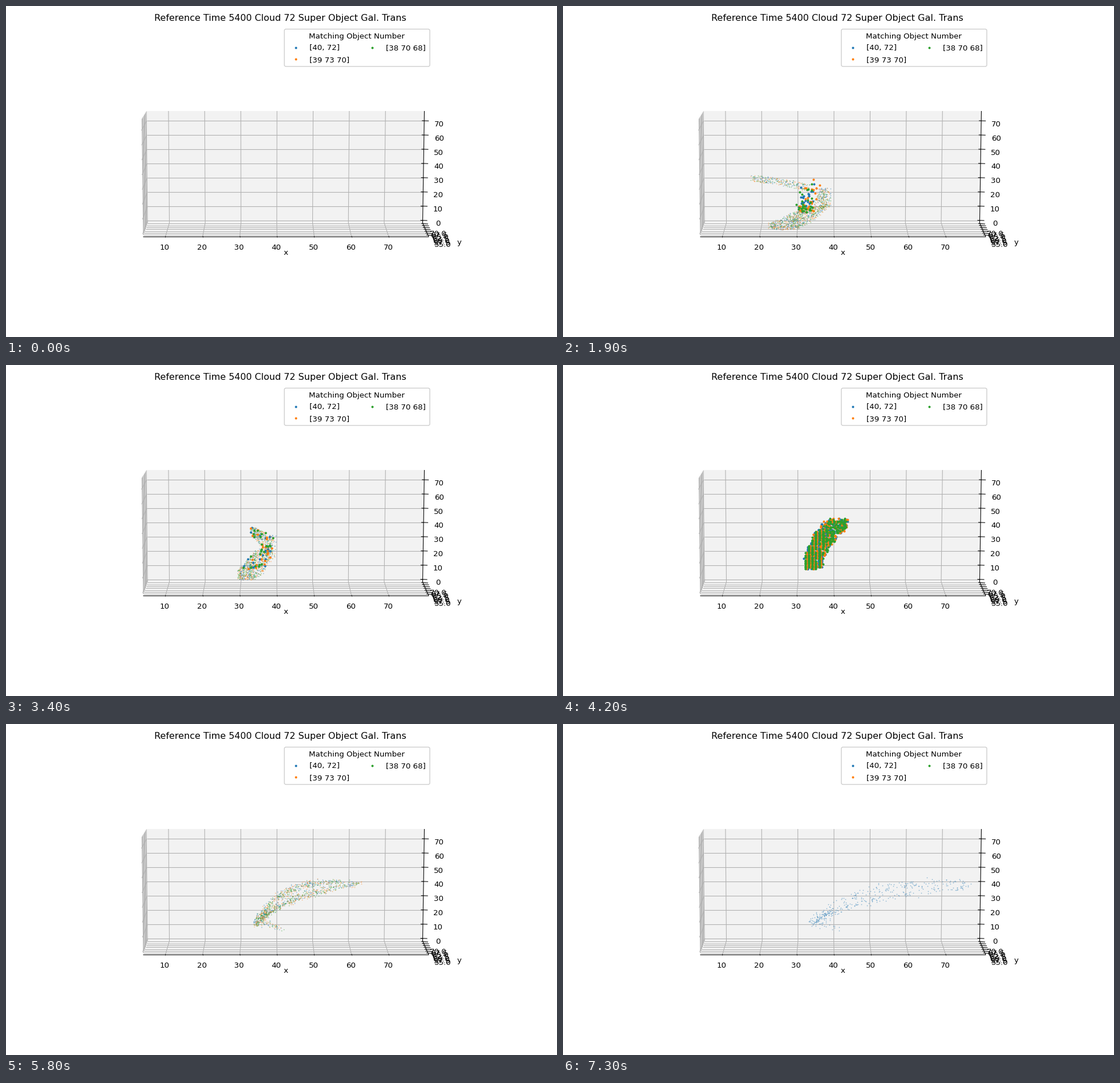
Animation, 966 px wide and 580 px high, one loop 7400 ms. Source, as a matplotlib script:

```python
import numpy as np
import matplotlib.pyplot as plt
from matplotlib.animation import FuncAnimation
from matplotlib.patches import FancyBboxPatch, Polygon

W, H, DPI = 966, 580, 96
FRAMES, STEP = 74, 100
COLORS = ["tab:blue", "tab:orange", "tab:green"]
N = 400                      # parcels per object
CLOUD_BASE = 357

plt.rcParams.update({"font.family": "DejaVu Sans", "font.size": 10.06})
fig = plt.figure(figsize=(W / DPI, H / DPI), dpi=DPI, facecolor="white")
ax = fig.add_axes([0, 0, 1, 1])
ax.set_xlim(0, W)
ax.set_ylim(H, 0)
ax.axis("off")


def line(x0, y0, x1, y1, color="#b0b0b0", z=2):
    ax.plot([x0, x1], [y0, y1], color=color, lw=0.8, zorder=z,
            solid_capstyle="butt")


def label(x, y, s, ha="center", **kw):
    ax.text(x, y, s, ha=ha, va="baseline", color="black", zorder=9, **kw)


def mix(p, q, f):
    return p[0] + (q[0] - p[0]) * f, p[1] + (q[1] - p[1]) * f


# Corners of the 3D box: left/right, back/front, top/bottom
LBT, RBT = (246.5, 184), (733.5, 184)
LBB, RBB = (248.5, 380), (730.5, 380)
LFT, LFB, RFB = (237.4, 199), (240, 404), (741, 404)


def draw_box():
    for pts, grey in (([LBT, LBB, LFB, LFT], 0.975),
                      ([LBT, RBT, RBB, LBB], 0.95),
                      ([LBB, RBB, RFB, LFB], 0.9625)):
        ax.add_patch(Polygon(pts, fc=str(grey), ec="none", zorder=1))

    for k in range(7):                       # x ticks 10 .. 70
        f = 0.0788 + 0.1302 * k
        top, back, front = mix(LBT, RBT, f), mix(LBB, RBB, f), mix(LFB, RFB, f)
        line(*top, *back)
        line(*back, *front)
        line(front[0], 402.5, front[0], 405.2, "black", 3)
        label(277.7 + 65.4 * k, 427.4, str(10 * (k + 1)))

    for k in range(7):                       # y ticks 55 .. 70
        f = 0.11 + 0.14 * k
        a, b = mix(LFB, LBB, f), mix(RFB, RBB, f)
        line(*mix(LFT, LBT, f), *a)
        line(*a, *b)
        line(b[0] - 3, b[1] - 0.2, b[0] + 9, b[1] + 0.8, "black", 3)
        label(766 - 1.37 * k, 422.4 - 3.3 * k, f"{55 + 2.5 * k:.1f}")

    for k in range(8):                       # z ticks 0 .. 70
        y = 375.5 - 24.93 * k
        f = (y - 184) / 196
        a, b = mix(LBT, LBB, f), mix(RBT, RBB, f)
        line(*a, *b)
        line(*a, 239.6 - 0.3 * k, 399.6 - 25.95 * k)
        line(b[0] - 4, y, b[0] + 8, y + 0.4, "black", 3)
        label(757 + 0.36 * k, 384.8 - 24.85 * k, str(10 * k))

    line(*LFB, *RFB, "black", 3)
    line(*RFB, *RBB, "black", 3)
    line(*RBB, *RBT, "black", 3)
    label(490.5, 435.5, "x")
    label(795, 417.8, "y")


def draw_legend():
    ax.add_patch(FancyBboxPatch((490.7, 43.2), 249.6, 60,
                                boxstyle="round,pad=2.7,rounding_size=2.7",
                                fc="white", ec="0.8", lw=1, zorder=8))
    label(615.3, 57.2, "Matching Object Number")
    names = ["[40, 72]", "[39 73 70]", "[38 70 68]"]
    for k, (c, name) in enumerate(zip(COLORS, names)):
        x, y = 507.5 + 134.2 * (k // 2), 72.6 + 20.6 * (k % 2)
        ax.scatter([x], [y], s=9, color=c, linewidths=0, zorder=9)
        label(x + 24.2, y + 4.7, name, "left")


def ramp(t, start, end):
    return min(max((t - start) / (end - start), 0), 1)


class Parcels:
    """Air parcels drawn into a cloud tower, then sheared away to the right."""

    def __init__(self, k):
        rng = np.random.default_rng(54 + k)
        self.last = FRAMES - 1 - k
        self.s, self.v = rng.random((2, N))      # along and across the strand
        self.g, self.h = np.clip(rng.normal(size=(2, N)), -2, 2)
        self.enter = 30 + 11.5 * rng.random(N) ** 0.4
        self.leave = 43.5 + 9 * rng.random(N)
        self.column = 422.4 + 2.1 * (2 * k % 3)
        self.a = np.clip(rng.normal(size=40), -2, 2)
        self.q = rng.random(40) ** 3

    def inflow(self, t):
        """C shape: low arm, hook on the right, high arm; both arms retract."""
        s, g, side = self.s, self.g, 2 * self.v - 1
        w = 1 - 2 * s / 0.62
        r = 0.5 + 0.3 * w + 0.2 * w ** 3
        thick = 4 + (7 + 0.2 * t) * np.sin(np.pi * np.clip(r, 0, 1))
        low = (462 - (169 - 3.6 * t) * r + 3 * g,
               384 - 34 * np.clip(1 - r, 0, 1) ** 1.7 + side * thick)
        hook = 444 + 0.6 * t + 7 * g, 330 + 0.3 * t + 17 * side
        r = 0.25 + 0.75 * (s - 0.78) / 0.22
        high = (462 - (233 - 5.4 * t) * r + 3 * g,
                302 + 25 * np.clip(1 - r, 0, 1) ** 1.5 + 6 * side)
        return np.select([s < 0.62, s < 0.78], [low, hook], high)

    def tower(self):
        """Filled cloud on a grid of model columns."""
        s = self.s
        a = np.clip(0.06 + 0.62 * s + 0.32 * s ** 6 + 0.02 * self.g, 0, 1)
        top = 269 + 79 * np.abs(1 - a / 0.8) ** 2.5
        base = CLOUD_BASE - 72 * (np.clip(a - 0.42, 0, 1) / 0.58) ** 0.55
        x = self.column + 6.3 * np.round((421 + 76 * a - self.column) / 6.3)
        x = x + 5 * self.h * np.clip(s - 0.5, 0, 0.3)
        y = top + (base - top) * self.v
        return np.array([x, CLOUD_BASE - 2.5 * np.round((CLOUD_BASE - y) / 2.5)])

    def outflow(self, t):
        """Band between a steep upper edge and a flatter lower edge."""
        s, age = self.s, t - 58
        b, tail = s ** 1.8, np.clip(1 - s / 0.07, 0, 1)
        ux = 435 + (145 + 8.1 * age) * b
        uy = 275 + 76 * (1 - b) ** 3.5
        lx = 448 + (179 + 6.6 * age) * b + 40 * tail
        ly = 346 - (68 - 0.4 * age) * b ** 0.6 + 15 * tail
        side = 2 * self.v - 1
        w = 0.5 + 0.5 * np.sign(side) * np.abs(side) ** 0.5
        blur = 2 + 0.1 * age
        edge = np.minimum(1, (1 - s) * 8)
        return np.array([ux + (lx - ux) * w + 1.6 * blur * self.g * edge,
                         uy + (ly - uy) * w + blur * self.h])

    def puffs(self, t):
        """Short-lived early cloud that shoots up around t = 19."""
        burst = np.exp(-((t - 19) / 4.5) ** 2)
        young = ramp(t, 19, 8)
        n = int((15 + 17 * burst) * ramp(t, 33, 28))
        q, dx = self.q[:n], 8 * self.a[:n]
        rise = (3 + 45 * burst) * q
        return np.column_stack([405 + t + dx + 0.25 * rise,
                                356 - 12 * young - rise - 0.35 * young * dx
                                - 5 * np.cos(40 * dx) * max(young, burst)])

    def at(self, t):
        if not 1 <= t <= self.last:
            return np.empty((0, 2)), np.empty((0, 2))
        if t <= 42:
            f = ramp(t, 27, 42)
            xy = self.inflow(min(t, 27)) * (1 - f) + self.tower() * f
        else:
            f = (1 - ramp(t, 42, 58)) ** 2
            xy = self.tower() * f + self.outflow(t) * (1 - f)
        xy[1] -= 6 * self.s * np.exp(-((t - 46.5) / 3) ** 2)
        cloudy = ((self.enter <= t) & (t < self.leave)
                  & (xy[1] <= CLOUD_BASE))
        return xy.T[~cloudy], np.vstack([xy.T[cloudy], self.puffs(t)])


draw_box()
draw_legend()
label(480.5, 26.4, "Reference Time 5400 Cloud 72 Super Object Gal. Trans",
      fontsize=12.03)

groups = [Parcels(k) for k in range(3)]
clear = [ax.scatter([], [], s=1.5, color=c, alpha=0.5, linewidths=0, zorder=4)
         for c in COLORS]
cloud = [ax.scatter([], [], s=9, color=c, linewidths=0, zorder=5)
         for c in COLORS]


def update(t):
    for group, dots, blobs in zip(groups, clear, cloud):
        faint, bold = group.at(t)
        dots.set_offsets(faint)
        blobs.set_offsets(bold)
    return clear + cloud


anim = FuncAnimation(fig, update, frames=FRAMES, interval=STEP, repeat=True)
plt.show()
```
